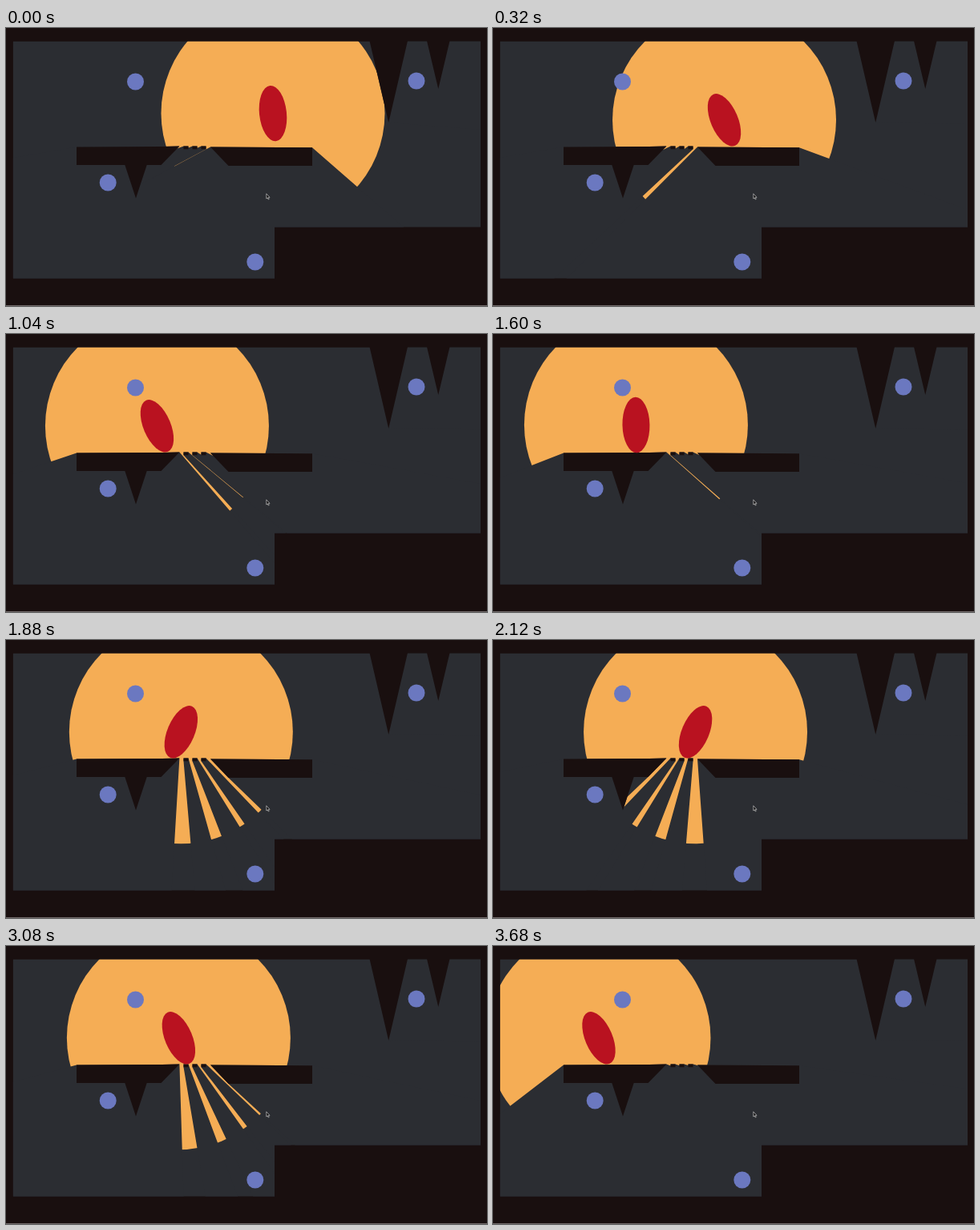
These frames come from a looping animation (600x347 px, 3720 ms). An HTML page:

```html
<!DOCTYPE html>
<html lang="en">
<head>
<meta charset="utf-8">
<title>Light and shadow</title>
<style>
html, body { margin: 0; width: 100%; height: 100%; overflow: hidden; background: #190f0f; }
svg { display: block; width: 600px; height: 347px; }
</style>
</head>
<body>
<svg viewBox="0 0 600 347">
  <defs>
    <clipPath id="room"><path d="M8.9 16.7H592V248.4H335V312.5H8.9Z"/></clipPath>
  </defs>
  <rect width="600" height="347" fill="#190f0f"/>
  <rect y="346" width="600" height="1" fill="#6f6868"/>
  <g clip-path="url(#room)">
    <rect width="600" height="347" fill="#2b2d32"/>
    <circle id="light" r="139.5" fill="#f5ad55"/>
    <path id="shadow" fill="#2b2d32"/>
  </g>
  <path id="walls" fill="#190f0f"/>
  <g fill="#6b78c0">
    <circle cx="161.5" cy="67" r="10.5"/>
    <circle cx="127.2" cy="193" r="10.5"/>
    <circle cx="512" cy="66" r="10.5"/>
    <circle cx="310.8" cy="292" r="10.5"/>
  </g>
  <ellipse id="body" rx="17" ry="34.8" fill="#b91220"/>
  <path d="M324.8 206.8V213L326.2 211.8L327.2 214L328.2 213.5L327.3 211.4H329Z" fill="#151515" stroke="#c8c8c8" stroke-width=".7"/>
</svg>
<script>
const LOOP = 3720, STEP = 40, FAR = 60;
const LEFT = .139, RIGHT = .1425;      // speeds in px/ms
const SOFT = 160;                      // half the time a turn takes
const TURNS = [1359, 2462];            // to the right, then back to the left
const TIPS = [1610, 2580];             // when the body passes upright
const LEAN = 23;

const light = document.getElementById("light");
const body = document.getElementById("body");
const shade = document.getElementById("shadow");

// Every shape is convex and runs clockwise
const spike = (x, y, w, h) => [[x, y], [x + w, y], [x + w / 2, y + h]];
const tooth = x => [[x, 147.4], [x + 6, 147.4], [x + 6, 151.2], [x, 151.2]];
const walls = [
  [[88, 148.6], [195, 147.9], [216.4, 147.4], [193.5, 171], [88, 171]],
  [[255, 148.5], [382, 149.3], [382, 172], [277.5, 172]],
  spike(148, 170, 28, 42.5),
  spike(453.5, 16, 47.5, 102),
  spike(525, 16, 28.5, 60),
  ...[0, 1, 2].map(i => tooth(221.5 + 11 * i))
];

const outline = points => "M" + points.map(p => p.join(" ")).join("L") + "Z";
document.getElementById("walls").setAttribute("d", walls.map(outline).join(""));

const clamp = u => Math.min(1, Math.max(0, u));

// 0 before a turn, elapsed time after it, with a rounded corner
function ramp(d) {
  if (Math.abs(d) >= SOFT) return Math.max(0, d);
  return (d + SOFT) ** 2 / (4 * SOFT);
}

function pose(t) {
  const [turn, back] = TURNS.map(at => ramp(t - at));
  const [tip, untip] = TIPS.map(at => clamp((t - at) / 400 + .5));
  const lean = LEAN * (2 * (tip - untip) - 1) + 17 * (1 - clamp(t / 280));
  const drop = 7 * (1 - clamp(t / 120));
  return {
    x: 333 - LEFT * t + (LEFT + RIGHT) * (turn - back),
    y: 113.5 + 1.3 * (lean / LEAN) ** 2 - drop,
    lean
  };
}

// Project every edge that faces the light away from it
function shadow(points, x, y) {
  const cast = p => [x + (p[0] - x) * FAR, y + (p[1] - y) * FAR];
  return points.map((p, i) => {
    const q = points[(i + 1) % points.length];
    const side = (q[0] - p[0]) * (y - p[1]) - (q[1] - p[1]) * (x - p[0]);
    return side < 0 ? outline([p, q, cast(q), cast(p)]) : "";
  }).join("");
}

function draw(ms) {
  const { x, y, lean } = pose(Math.floor((ms % LOOP) / STEP) * STEP);
  light.setAttribute("cx", x);
  light.setAttribute("cy", y);
  body.setAttribute("transform", `translate(${x} ${y}) rotate(${lean})`);
  shade.setAttribute("d", walls.map(w => shadow(w, x, y)).join(""));
}

let start;
function tick(now) {
  start ??= now;
  draw(Math.max(0, now - start));
  requestAnimationFrame(tick);
}
draw(0);
requestAnimationFrame(tick);
</script>
</body>
</html>
```
